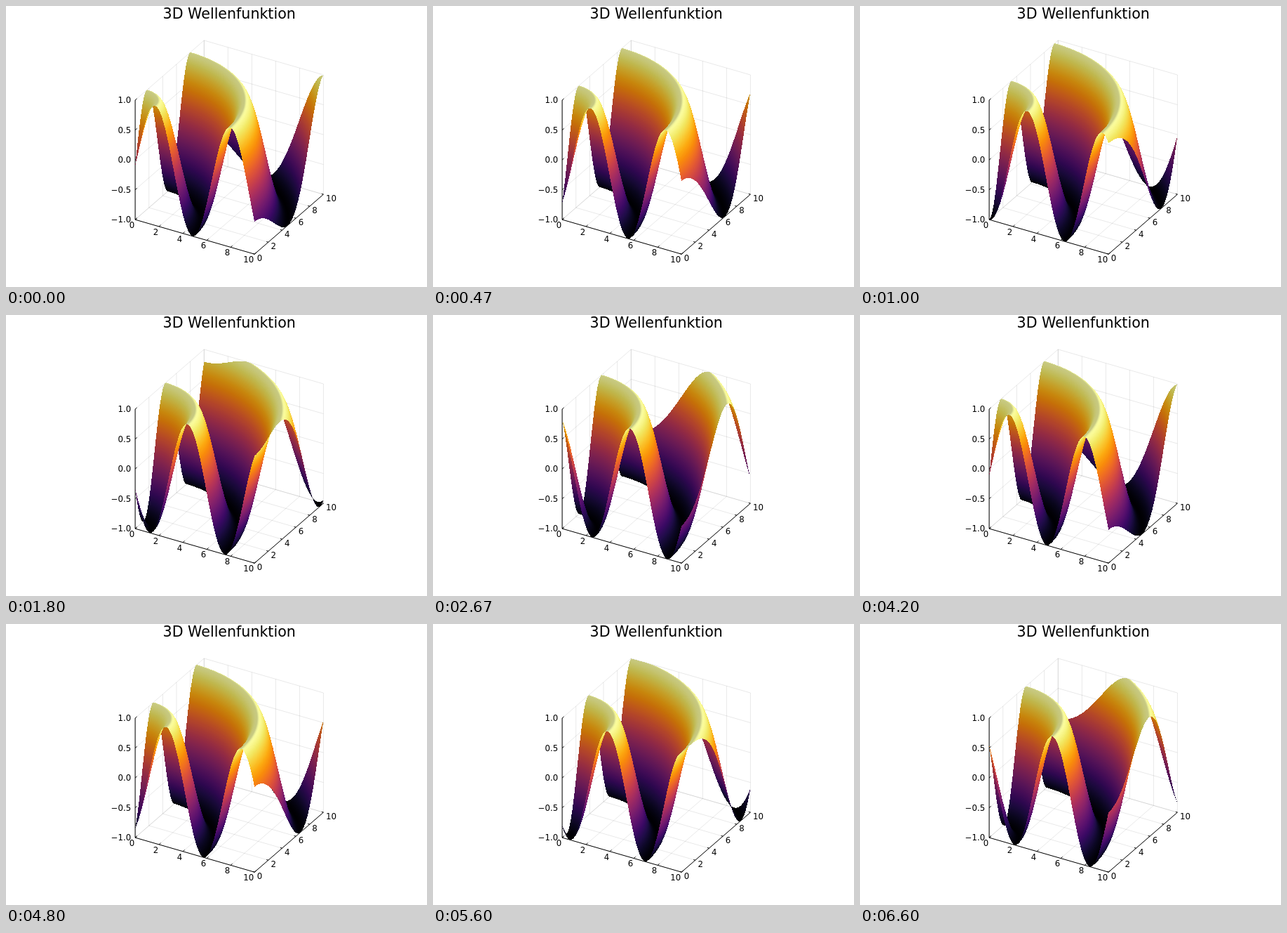
An HTML page with a canvas that plays this animation: 600 px wide and 400 px high, repeating every 6.67 s.

```html
<!DOCTYPE html>
<html lang="de">
<head>
<meta charset="utf-8">
<title>3D Wellenfunktion</title>
<style>
  html, body { margin: 0; width: 100%; height: 100%; overflow: hidden; background: #fff; }
  svg, canvas { position: absolute; left: 0; top: 0; width: 600px; height: 400px; }
  text { font: 11.75px "DejaVu Sans", sans-serif; }
  .title { font-size: 20.6px; }
  .grid { stroke: #000; stroke-opacity: .09; fill: none; }
  .axis { stroke: #000; fill: none; }
</style>
</head>
<body>
<svg id="axes" width="600" height="400" viewBox="0 0 600 400"></svg>
<canvas id="surface" width="600" height="400"></canvas>
<script>
const W = 600, H = 400, N = 101;
const FRAMES = 100, LOOP = 6670, FRAME = 200 / 3;

// Orthographic view, azimuth 30, elevation 30
const project = (x, y, z) => [
  184.1 + 17.01 * x + 9.82 * y,
  304.1 + 4.91 * x - 8.505 * y - 85.05 * (z + 1)
];

function drawAxes() {
  const grid = [], axis = [], labels = [];
  const seg = (a, b) => `M${project(...a)}L${project(...b)}`;
  const label = (p, text, dx, dy, anchor) =>
    labels.push(`<text x="${p[0] + dx}" y="${p[1] + dy}" text-anchor="${anchor}">${text}</text>`);

  for (let v = 0; v <= 10; v += 2) {
    grid.push(seg([v, 0, -1], [v, 10, -1]), seg([v, 10, -1], [v, 10, 1]));
    grid.push(seg([0, v, -1], [10, v, -1]), seg([0, v, -1], [0, v, 1]));
    axis.push(seg([v, 0, -1], [v, .25, -1]), seg([10, v, -1], [9.85, v, -1]));
    label(project(v, 0, -1), v, -.9, 11.8, "end");
    label(project(10, v, -1), v, 3.6, 10, "start");
  }
  for (let z = -1; z <= 1; z += .5) {
    grid.push(seg([0, 0, z], [0, 10, z]), seg([0, 10, z], [10, 10, z]));
    axis.push(seg([0, 0, z], [0, .25, z]));
    label(project(0, 0, z), z.toFixed(1).replace("-", "\u2212"), -5.8, 4.3, "end");
  }
  axis.push(seg([0, 0, -1], [0, 0, 1]), seg([0, 0, -1], [10, 0, -1]), seg([10, 0, -1], [10, 10, -1]));

  document.getElementById("axes").innerHTML =
    `<path class="grid" d="${grid.join("")}"/><path class="axis" d="${axis.join("")}"/>` +
    `<text class="title" x="318.2" y="18.4" text-anchor="middle">3D Wellenfunktion</text>` +
    labels.join("");
}

// Inferno colour map
const INFERNO = [
  [0, 0, 4], [11, 7, 36], [31, 12, 72], [57, 9, 99], [85, 15, 109], [110, 25, 110],
  [136, 34, 106], [161, 43, 98], [186, 54, 85], [208, 70, 68], [227, 89, 51], [241, 113, 31],
  [249, 140, 10], [252, 170, 16], [249, 201, 50], [242, 232, 98], [252, 255, 164]
];
const palette = Array.from({ length: 257 }, (_, i) => {
  const k = Math.min(15, i >> 4), f = i / 16 - k;
  return INFERNO[k].map((c, j) => c + (INFERNO[k + 1][j] - c) * f);
});

const ctx = document.getElementById("surface").getContext("2d");
const image = ctx.createImageData(W, H);
const pixels = image.data;
const px = new Float64Array(N * N), py = new Float64Array(N * N);
const height = new Float64Array(N * N), slant = new Float64Array(N * N);

function shade(s) {
  const u = Math.max(0, Math.min(1, (s + .2) / .9));
  return .79 + .21 * u * u * (3 - 2 * u);
}

function fillTriangle(a, b, c) {
  const ax = px[a], ay = py[a], bx = px[b], by = py[b], cx = px[c], cy = py[c];
  const area = (bx - ax) * (cy - ay) - (by - ay) * (cx - ax);
  if (Math.abs(area) < 1e-9) return;
  const side = area < 0 ? 1 : -1; // upper or lower face towards the viewer
  const x0 = Math.ceil(Math.min(ax, bx, cx) - .5), x1 = Math.floor(Math.max(ax, bx, cx) - .5);
  const y0 = Math.ceil(Math.min(ay, by, cy) - .5), y1 = Math.floor(Math.max(ay, by, cy) - .5);
  for (let y = y0; y <= y1; y++) {
    for (let x = x0; x <= x1; x++) {
      const dx = x + .5 - ax, dy = y + .5 - ay;
      const v = (dx * (cy - ay) - dy * (cx - ax)) / area;
      const w = ((bx - ax) * dy - (by - ay) * dx) / area;
      const u = 1 - v - w;
      if (u < -1e-6 || v < -1e-6 || w < -1e-6) continue;
      const z = u * height[a] + v * height[b] + w * height[c];
      const light = shade(side * (u * slant[a] + v * slant[b] + w * slant[c]));
      const rgb = palette[Math.max(0, Math.min(256, Math.round((z + 1) * 128)))];
      const o = (y * W + x) * 4;
      for (let j = 0; j < 3; j++) pixels[o + j] = rgb[j] * light;
      pixels[o + 3] = 255;
    }
  }
}

function drawSurface(t) {
  pixels.fill(0);
  for (let j = 0, k = 0; j < N; j++) {
    for (let i = 0; i < N; i++, k++) {
      const x = i / 10, y = j / 10, r = Math.hypot(x, y);
      const slope = 5 * Math.cos(r - t);
      height[k] = Math.sin(r - t);
      [px[k], py[k]] = project(x, y, height[k]);
      slant[k] = -slope * (.9 * x + .43 * y) / (r || 1) / Math.hypot(1, slope);
    }
  }
  // Cells from back to front
  for (let j = N - 2; j >= 0; j--) {
    for (let i = 0; i < N - 1; i++) {
      const k = j * N + i;
      fillTriangle(k, k + N + 1, k + N);
      fillTriangle(k, k + 1, k + N + 1);
    }
  }
  ctx.putImageData(image, 0, 0);
}

let shown = -1;
function tick() {
  const time = performance.now() % LOOP;
  let k = Math.min(FRAMES - 1, Math.floor((time + 5) / FRAME));
  if (time < 10 * Math.round(k * FRAME / 10)) k--;
  if (k !== shown) {
    shown = k;
    drawSurface((k + 1) / 10);
  }
  requestAnimationFrame(tick);
}

drawAxes();
tick();
</script>
</body>
</html>
```
